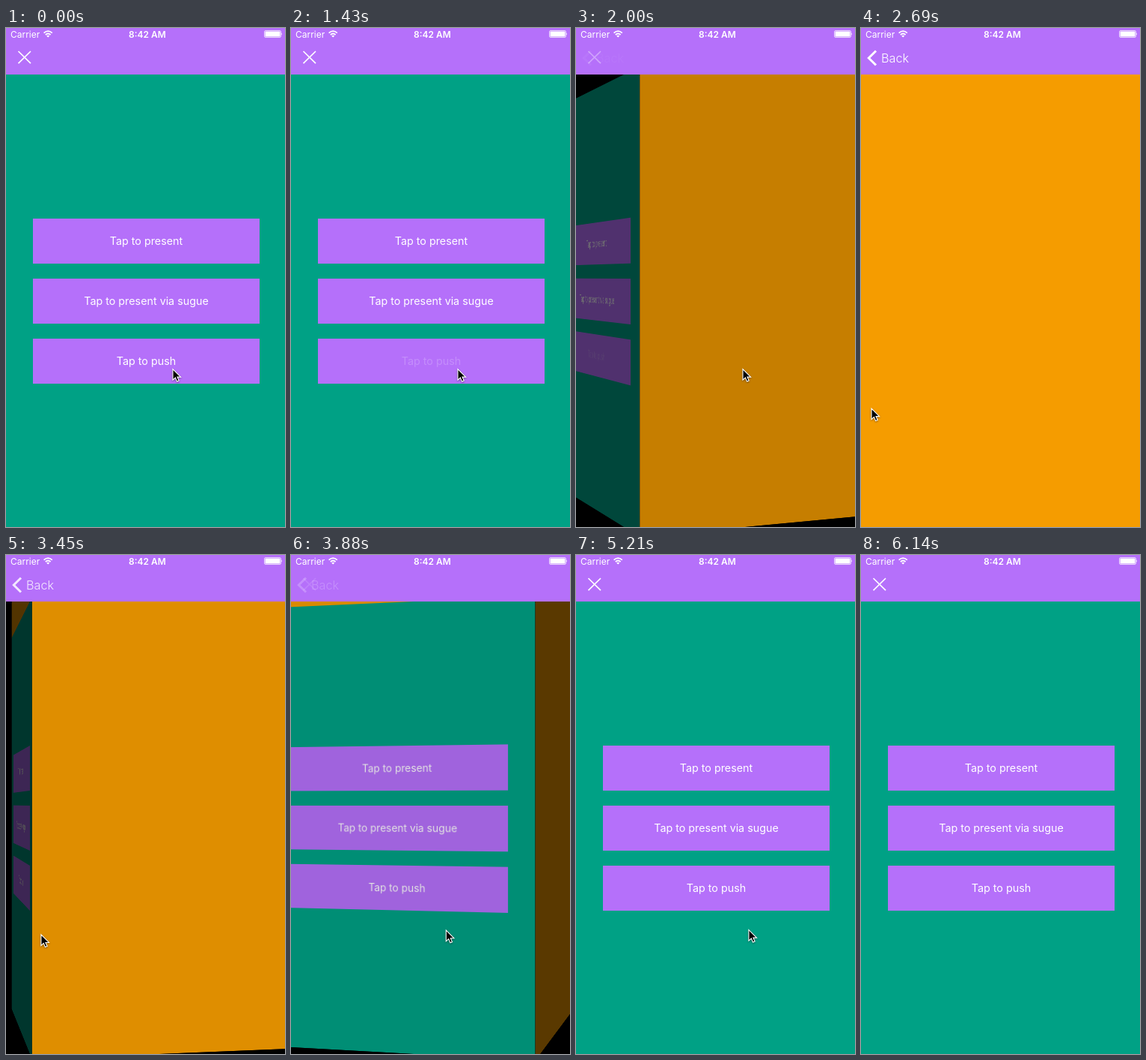
Recreate the animation shown at these times as an HTML page. Size 373 by 665 pixels, loop 6550 ms.

```html
<!DOCTYPE html>
<html lang="en">
<head>
<meta charset="utf-8">
<title>Cube navigation</title>
<style>
  :root { --purple: #b570fa; --green: #00a185; --orange: #f59c00; }
  html, body { margin: 0; width: 100%; height: 100%; overflow: hidden; background: #000; }
  body { position: relative; font-family: Inter, Roboto, sans-serif; color: #fff; }
  #scene { position: absolute; left: 0; top: -2px; width: 375px; height: 667px; perspective: 1550px; }
  #cube, .face, .dim { position: absolute; inset: 0; }
  #cube { transform-style: preserve-3d; }
  .face { backface-visibility: hidden; }
  #home { transform: translateZ(187.5px); }
  #detail { transform: rotateY(90deg) translateZ(187.5px); background: var(--orange); }
  .page { position: absolute; inset: 64px 0 0; background: var(--green); }
  .button {
    position: absolute; left: 36px; width: 303px; height: 60px;
    background: var(--purple); font-size: 14.3px; line-height: 60px; text-align: center;
  }
  .dim { background: #000; opacity: 0; }
  #bar, #pointer { position: absolute; left: 0; top: 0; width: 373px; height: 665px; overflow: hidden; }
  #bar { height: 62px; background: var(--purple); }
</style>
</head>
<body>
<div id="scene">
  <div id="cube">
    <div class="face" id="home">
      <div class="page">
        <div class="button" style="top:191.5px">Tap to present</div>
        <div class="button" style="top:271.5px">Tap to present via sugue</div>
        <div class="button" style="top:351.5px"><span id="push">Tap to push</span></div>
      </div>
      <div class="dim" id="homeDim"></div>
    </div>
    <div class="face" id="detail"><div class="dim" id="detailDim"></div></div>
  </div>
</div>

<svg id="bar" fill="#fff">
  <text x="6" y="12.6" font-size="12">Carrier</text>
  <g fill="none" stroke="#fff" stroke-width="1.7">
    <path d="M50.6 6.6Q56.2 1.6 61.8 6.6M52.8 9Q56.2 6 59.6 9"/>
  </g>
  <path d="M54.2 10.4Q56.2 8.9 58.2 10.4L56.2 12.6Z"/>
  <text x="189" y="12.6" font-size="12" font-weight="600" text-anchor="middle">8:42 AM</text>
  <rect x="345.5" y="3.5" width="22" height="9" rx="1.6" fill="none" stroke="#fff" stroke-opacity=".7"/>
  <rect x="346.5" y="4.5" width="20" height="7" rx=".6"/>
  <path d="M368.4 6.2q1.6 1.8 0 3.6z"/>
  <path id="close" d="M16.5 31L33 47.2M33 31L16.5 47.2" stroke="#fff" stroke-width="1.7"/>
  <g id="back">
    <path d="M20 30.5L10.3 40L20 49.5" fill="none" stroke="#fff" stroke-width="3"/>
    <text x="27" y="46" font-size="16.2" font-weight="300">Back</text>
  </g>
</svg>

<svg id="pointer">
  <path id="arrow" d="M0 0V14.6L3.4 11.5L5.6 16.6L8.2 15.5L6 10.6H10.6Z" stroke="#fff" stroke-width="1.1"
    style="filter:drop-shadow(0 1px 1px #0006)"/>
</svg>

<script>
const LOOP = 6550;
const PUSH = { start: 1645, length: 800 };
const DRAG = { start: 3275, release: 4200, end: 4640 };

// Pointer tip: time, x, y
const POINTER = [
  [0, 223, 454.5], [2340, 223, 454.5], [2680, 14, 507],
  [DRAG.start, 14, 507], [3930, 210, 500], [4180, 229, 497.5],
  [5170, 229, 497.5], [5650, 337, 608], [5850, 328, 640], [6140, 302, 672]
];

const $ = id => document.getElementById(id);
const clamp = v => Math.min(1, Math.max(0, v));
const mix = (a, b, k) => a + (b - a) * k;
const sine = u => (1 - Math.cos(Math.PI * u)) / 2;

// cubic-bezier(.25, .1, .25, 1)
function ease(u) {
  let lo = 0, hi = 1;
  for (let i = 0; i < 24; i++) {
    const s = (lo + hi) / 2;
    if (.75 * s * (1 - s) + s ** 3 < u) lo = s; else hi = s;
  }
  return .3 * lo * (1 - lo) ** 2 + 3 * lo * lo * (1 - lo) + lo ** 3;
}

function pointerAt(t) {
  const next = POINTER.findIndex(key => key[0] > t);
  if (next < 0) return POINTER.at(-1).slice(1);
  const a = POINTER[next - 1], b = POINTER[next];
  const k = sine((t - a[0]) / (b[0] - a[0]));
  return [mix(a[1], b[1], k), mix(a[2], b[2], k)];
}

// The swipe scrubs the pop; after release it runs to the end.
function popTime(t) {
  if (t < DRAG.start) return 0;
  const held = (pointerAt(Math.min(t, DRAG.release))[0] - 4) / 375;
  return mix(held, 1, clamp((t - DRAG.release) / (DRAG.end - DRAG.release)));
}

function draw(t) {
  const popping = t >= DRAG.start;
  const u = popping ? popTime(t) : clamp((t - PUSH.start) / PUSH.length);
  const turn = popping ? 1 - ease(u) : ease(u);

  $('cube').style.transform = `translateZ(-187.5px) rotateY(${-90 * turn}deg)`;
  $('home').style.background = popping && u < 1 ? 'var(--orange)' : 'none';
  $('homeDim').style.opacity = .75 * turn;
  $('detailDim').style.opacity = .75 * (1 - turn);
  $('push').style.opacity = t >= 1430 && !popping ? .2 : 1;

  const leaving = clamp(1 - 1.45 * u), entering = clamp((u - .3) / .7) ** 2;
  $('close').style.opacity = popping ? entering : leaving;
  $('back').style.opacity = popping ? leaving : entering;

  $('arrow').setAttribute('transform', `translate(${pointerAt(t)})`);
}

function frame() {
  draw(performance.now() % LOOP);
  requestAnimationFrame(frame);
}
frame();
</script>
</body>
</html>
```
